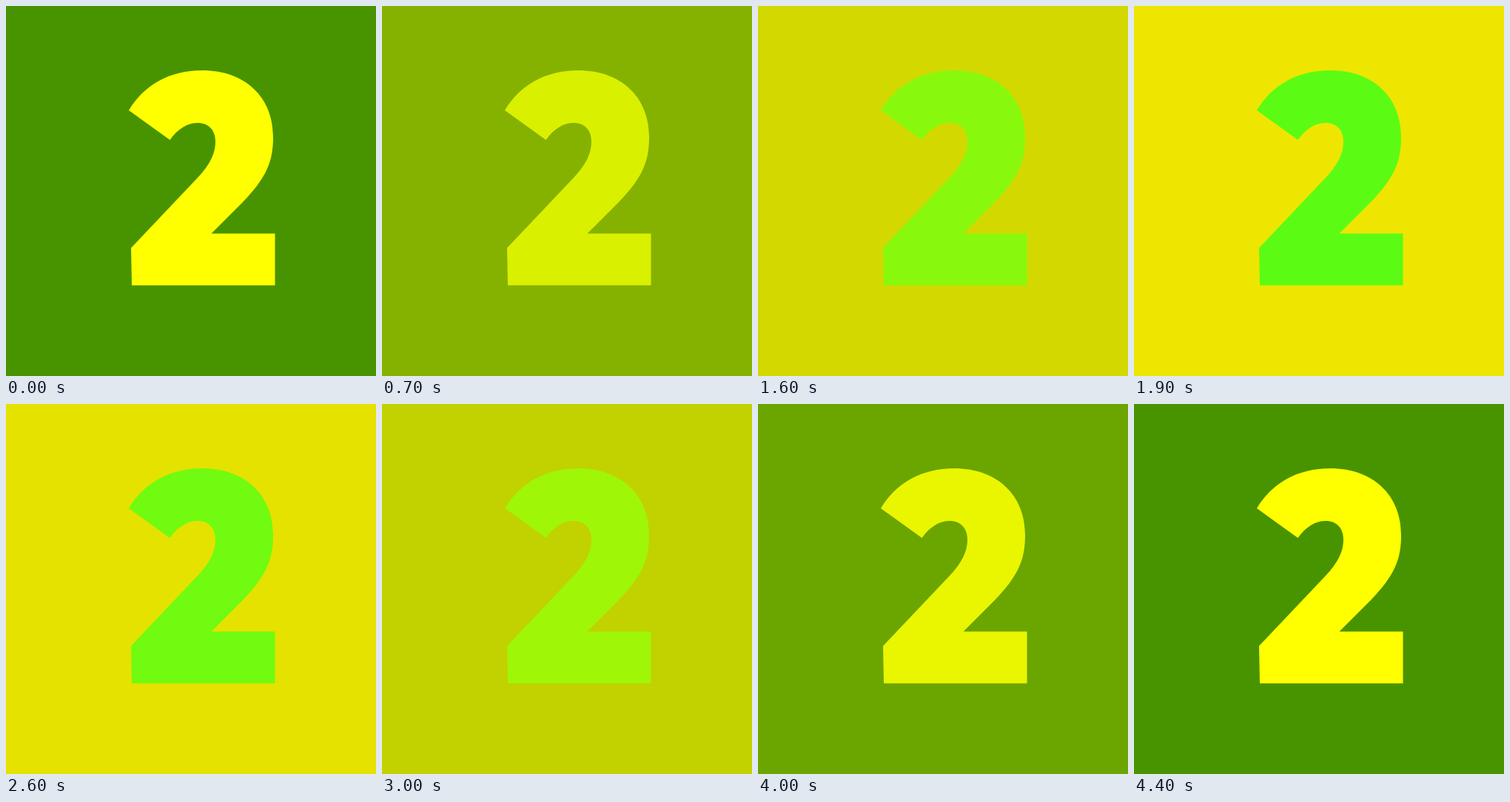
An HTML page that plays this animation: 500x500 px, repeating every 4500 ms.

```html
<!DOCTYPE html>
<html lang="en">
<head>
<meta charset="utf-8">
<title>Two</title>
<style>
  html, body { margin: 0; width: 100%; height: 100%; overflow: hidden; background: rgb(72, 148, 0); }
  svg { display: block; width: 100%; height: 100%; }
</style>
</head>
<body>
<svg viewBox="0 0 500 500" role="img" aria-label="2">
  <rect id="ground" width="500" height="500" fill="rgb(72,148,0)"/>
  <path id="digit" fill="rgb(255,255,0)" d="M166 141 C186 107 221 87 265 87 C322 87 361 122 361 177
    C361 210 352 232 320 265 L277.5 307.5 H363.5 V377.5 H170 L169 327 L259 232
    C276 214 283 199 283 183 C283 168 274 158 259 158 C245 158 232 166 221.5 181 Z"/>
</svg>
<script>
const STEP = 100, COUNT = 45, PEAK = 21;

// Each stop: [step, r, g, b]
const groundStops = [[0, 72, 148, 0], [PEAK, 255, 239, 0]];
const digitStops = [
  [0, 255, 255, 0], [7, 217, 240, 0], [13, 171, 245, 5],
  [18, 112, 251, 16], [19, 92, 251, 20], [PEAK, 40, 255, 28]
];

const ground = document.getElementById('ground');
const digit = document.getElementById('digit');

function colorAt(stops, step) {
  const i = Math.max(1, stops.findIndex(s => s[0] >= step));
  const a = stops[i - 1], b = stops[i];
  const k = (step - a[0]) / (b[0] - a[0]);
  const rgb = [1, 2, 3].map(c => Math.round(a[c] + (b[c] - a[c]) * k));
  return `rgb(${rgb})`;
}

function draw(now) {
  const index = Math.floor(now / STEP) % COUNT;
  // Forward, a short hold at the peak, then back the same way
  const step = Math.min(index, COUNT - 1 - index, PEAK);
  ground.setAttribute('fill', colorAt(groundStops, step));
  digit.setAttribute('fill', colorAt(digitStops, step));
}

const start = performance.now();
function tick() {
  draw(performance.now() - start);
  requestAnimationFrame(tick);
}
tick();
</script>
</body>
</html>
```
